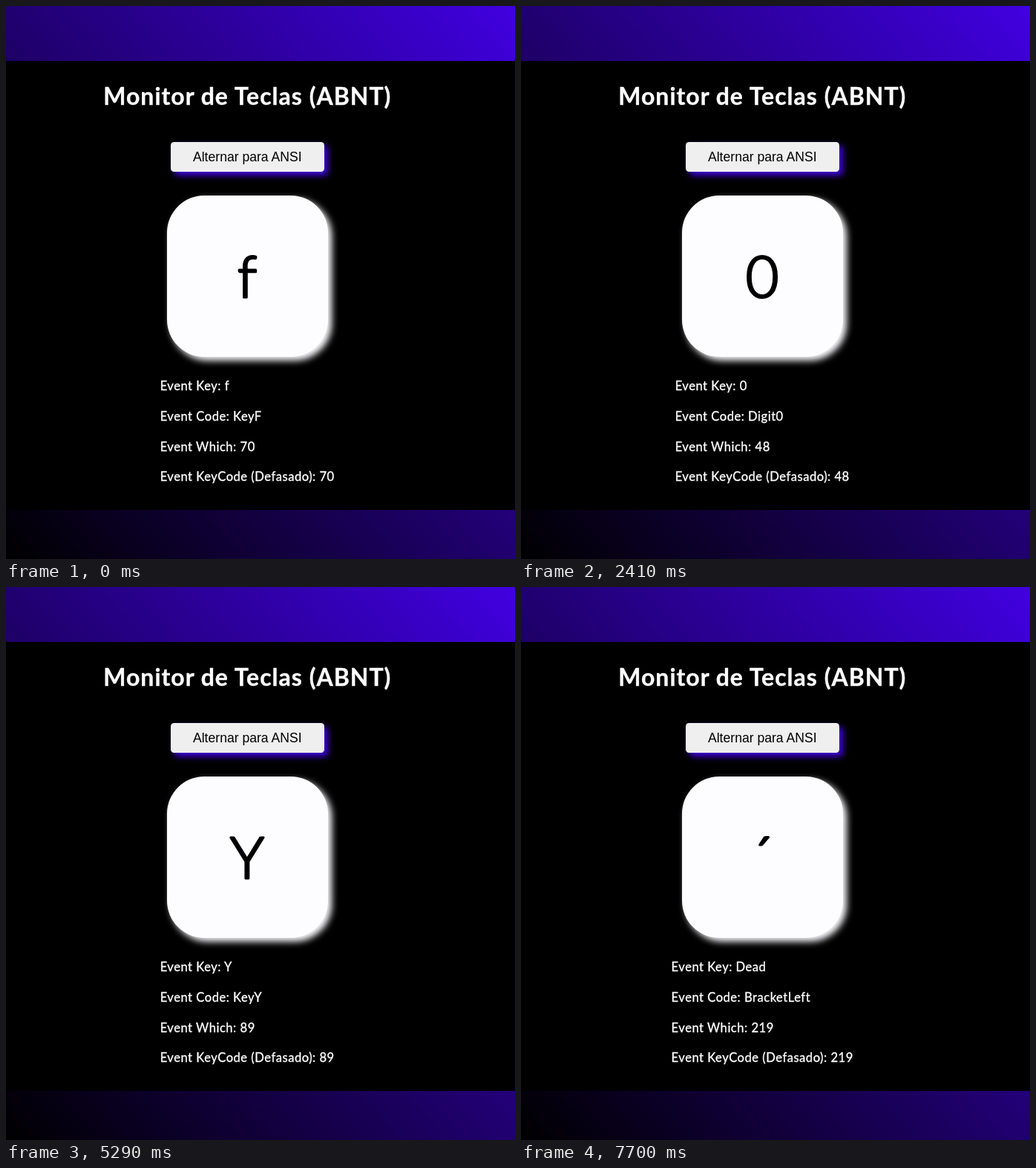
Animation of 686 by 744 pixels, one loop 8000 ms. Source, as an HTML page:

```html
<!DOCTYPE html>
<html lang="pt-BR">
<head>
<meta charset="utf-8">
<title>Monitor de Teclas</title>
<style>
  html, body { margin: 0; width: 100%; height: 100%; overflow: hidden; background: #000; }
  svg {
    display: block; width: 686px; height: 744px; font-family: Lato, sans-serif;
    background: linear-gradient(to top right, #000, #4000e0);
  }
  .title { font-size: 32px; font-weight: 700; letter-spacing: 1px; text-anchor: middle; }
  .button { fill: #efefef; filter: drop-shadow(5px 5px 4px #4000e0); }
  .button-text { font: 17.6px "Liberation Sans", Arial, sans-serif; text-anchor: middle; }
  .key { fill: #fdfcff; filter: drop-shadow(5px 5px 5px #fdfcff); }
  .key-text {
    font-size: 77px; font-weight: 300; letter-spacing: 2px; text-anchor: middle;
    stroke: #000; stroke-width: 3px; stroke-linejoin: round;
  }
  .info { font-size: 16.6px; letter-spacing: .5px; stroke-width: .35px; }
  .title, .info { fill: #fff; stroke: #fff; stroke-linejoin: round; }
  .title { stroke-width: .4px; }
</style>
</head>
<body>
<svg viewBox="0 0 686 744">
  <rect y="74" width="686" height="604"/>
  <text class="title" x="325.3" y="133">Monitor de Teclas (ABNT)</text>
  <rect class="button" x="222" y="183" width="207" height="40" rx="4.5"/>
  <text class="button-text" x="325.3" y="209">Alternar para ANSI</text>
  <rect class="key" x="217" y="255" width="217" height="217" rx="50"/>
  <text class="key-text" x="326" y="391.5"></text>
  <text class="info" y="517"></text>
  <text class="info" y="558"></text>
  <text class="info" y="599"></text>
  <text class="info" y="639"></text>
</svg>
<script>
  const LOOP = 8000;
  const CENTER = 325.2;

  // [time in ms, event.key, event.code, event.which, label when it differs from the key]
  const presses = [
    [0, 'f', 'KeyF', 70],
    [260, 'd', 'KeyD', 68],
    [770, 'r', 'KeyR', 82],
    [1160, 'y', 'KeyY', 89],
    [1630, '7', 'Digit7', 55],
    [1980, '5', 'Digit5', 53],
    [2320, '0', 'Digit0', 48],
    [3910, 'CapsLock', 'CapsLock', 20, 'CapsL'],
    [4730, 'T', 'KeyT', 84],
    [5290, 'Y', 'KeyY', 89],
    [5590, 'W', 'KeyW', 87],
    [5890, 'E', 'KeyE', 69],
    [6280, 'R', 'KeyR', 82],
    [6580, ',', 'Comma', 188],
    [6840, '.', 'Period', 190],
    [7530, 'Dead', 'BracketLeft', 219, '´']
  ];

  const keyText = document.querySelector('.key-text');
  const infoLines = [...document.querySelectorAll('.info')];
  let shown;

  function show([, key, code, which, label = key]) {
    keyText.textContent = label;
    const texts = [
      `Event Key: ${key}`,
      `Event Code: ${code}`,
      `Event Which: ${which}`,
      `Event KeyCode (Defasado): ${which}`
    ];
    infoLines.forEach((line, i) => line.textContent = texts[i]);
    // The block is centred as a whole, its lines are left-aligned.
    const width = Math.max(...infoLines.map(line => line.getComputedTextLength()));
    infoLines.forEach(line => line.setAttribute('x', CENTER - width / 2));
  }

  function tick() {
    const time = performance.now() % LOOP;
    const press = presses.findLast(([start]) => start <= time);
    if (press !== shown) show(shown = press);
    requestAnimationFrame(tick);
  }
  tick();
</script>
</body>
</html>
```
